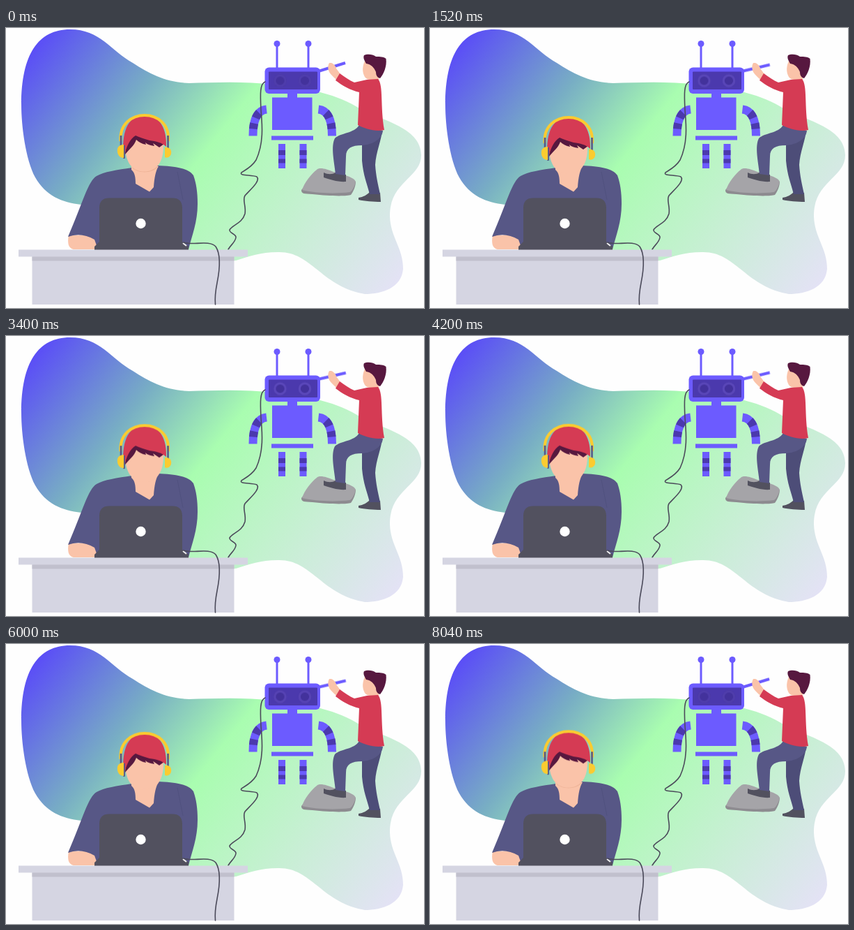
Animation, 600 px wide and 401 px high, one loop 8.08 s. Source, as an HTML page:

```html
<!DOCTYPE html>
<html lang="en">
<head>
<meta charset="utf-8">
<title>Building a robot</title>
<style>
  :root {
    --loop: 8080ms;
    --violet: #6c5bff; --deep: #4b39ad;
    --navy: #575786; --shade: #4d4d78; --dark: #52515f;
    --skin: #fac3a9; --red: #d53b54; --plum: #57183f; --yellow: #fbcb30;
  }
  html, body { margin: 0; width: 100%; height: 100%; overflow: hidden; background: #fefefe; }
  svg { display: block; width: 100%; height: 100%; }
  .violet { fill: var(--violet); }
  .deep { fill: var(--deep); }
  .navy { fill: var(--navy); }
  .shade { fill: var(--shade); }
  .dark { fill: var(--dark); }
  .skin { fill: var(--skin); }
  .red { fill: var(--red); }
  .plum { fill: var(--plum); }
  .yellow { fill: var(--yellow); }
  .line { fill: none; stroke: #4b4a5a; stroke-width: 1.6; stroke-linecap: round; }
  .arm { fill: none; stroke: var(--violet); stroke-width: 12; }
  .bands { stroke: var(--deep); stroke-dasharray: 0 12 9 8 8 40; }

  .head { animation: nod calc(var(--loop) / 18) ease-in-out infinite; }
  .tool { transform-origin: 450px 61.5px; animation: turn calc(var(--loop) / 18) ease-in-out infinite; }
  .glow { animation: glow calc(var(--loop) / 8) linear infinite; }
  @keyframes nod { 50% { transform: translateY(3.3px); } }
  @keyframes turn { 50% { transform: rotate(4.5deg); } }
  @keyframes glow {
    0%, 80%, 100% { opacity: 0; }
    8% { opacity: .85; }
    30% { opacity: 1; }
    51% { opacity: .75; }
  }
</style>
</head>
<body>
<svg viewBox="0 0 600 401" preserveAspectRatio="none">
  <defs>
    <linearGradient id="sky" gradientUnits="userSpaceOnUse" x1="25" y1="50" x2="517" y2="443">
      <stop offset="0" stop-color="#5b4ff6"/>
      <stop offset=".25" stop-color="#78aec4"/>
      <stop offset=".45" stop-color="#a9fdb0"/>
      <stop offset="1" stop-color="#e6e1f8"/>
    </linearGradient>
    <g id="eye">
      <circle r="9.5" fill="#43329c"/>
      <circle class="glow" r="7.8" fill="none" stroke="#5b48ba" stroke-width="3.4"/>
    </g>
    <g id="limb">
      <path class="arm" d="M374 116.500C361 118 354.500 130 354.500 154.500"/>
      <path class="arm bands" d="M374 116.500C361 118 354.500 130 354.500 154.500"/>
      <path class="violet" d="M391 166h10v35h-10z"/>
      <path class="deep" d="M391 175h10v7h-10zM391 187.500h10v6h-10z"/>
    </g>
  </defs>

  <path fill="url(#sky)" d="M22 110C22 38 46 2 92 2C135 2 150 32 182 50C207 66 230 78 263 79
    C300 78 340 76 385 81C430 84 480 97 507 115C530 130 596 140 596 182C596 215 550 220 551 270
    C552 300 570 315 570 345C568 372 540 381 515 381C452 370 438 319 390 321C365 321 350 327 330 333
    L200 340L140 265L108 253C80 250 57 240 42 214C28 188 22 140 22 110Z"/>

  <!-- robot -->
  <path d="M389 22V58M434 22V58" stroke="#6c5bff" stroke-width="3"/>
  <circle class="violet" cx="389" cy="22.500" r="4.500"/>
  <circle class="violet" cx="434" cy="22.500" r="4.500"/>
  <rect class="violet" x="371.500" y="56.500" width="79.500" height="37.500" rx="6"/>
  <rect class="deep" x="377" y="62.500" width="70" height="25.500" rx="1"/>
  <use href="#eye" x="393.500" y="75.500"/>
  <use href="#eye" x="429" y="75.500"/>
  <path class="violet" d="M404 93h14v6.500h21.500v46.500h-57.500v-46.500h22zM381 154.500h60v6h-60z"/>
  <use href="#limb"/>
  <use href="#limb" transform="matrix(-1 0 0 1 822.5 0)"/>

  <!-- engineer -->
  <path fill="#8d8b90" d="M424 232C424 238 428 237 440 238C465 241 490 241 495 239C499 234 502 226 502 220L440 212Z"/>
  <path fill="#a5a4a8" d="M446 203C450 199 460 202 470 206C485 210 500 214 502 220C500 227 498 232 494 235
    C470 238 440 236 425 232C428 222 438 209 446 203Z"/>
  <path class="dark" d="M456 207C462 210 468 210 473 207L488 210L488 220C478 221 464 217 456 214Z"/>
  <path class="dark" d="M506 243C513 242 518 239 522 235L537 236L538 249C528 249 514 248 506 246Z"/>
  <path class="shade" d="M511 160L540 147C539 160 531 178 530 196C531 212 534 224 537 238L522 238
    C518 222 513 212 511 190Z"/>
  <path class="navy" d="M507 139L541 147C540 158 528 167 511 168C496 168 488 172 488 184L487 211L473 209
    C471 190 466 170 472 158C480 150 500 151 507 139Z"/>
  <path class="skin" d="M515 47C512 54 511 61 514 68C516 73 520 74 524 74L520 79L535 79L535 55Z"/>
  <path class="plum" d="M514 39C518 37 526 37 531 41C537 41 542 41 545.500 44C547 55 542 66 537 72
    C533 71 531 68 531 63C528 56 524 52 517 51C515 47 512 43 514 39Z"/>
  <path class="tool" d="M450 61.500L487 50" stroke="#6c5bff" stroke-width="4"/>
  <path class="skin" d="M464 50C461 55 462 62 467 67L474 74L480 66L474 58C474 55 470 51 467 50Z"/>
  <path class="red" d="M518 74L534 73C542 82 537 112 543 146C530 149 515 144 505 139L507 92
    C494 89 482 82 473 75L479 65C486 70 493 75 500 78Z"/>

  <path class="line" d="M372 77C364 80 365 96 366 118C368 140 370 165 359 189C352 200 342 204 338 207
    C334 212 352 210 360 213C366 219 350 232 343 240C339 247 345 255 343 266C339 280 325 282 321 289
    C320 294 331 295 330 300C329 307 323 310 319 317"/>

  <!-- coder -->
  <path class="skin" d="M90 297C87 312 92 317 99 317L130 317L138 306L126 296Z"/>
  <path class="navy" d="M181 200C160 203 140 206 130 212C118 219 111 248 89 299Q108 292 127 303L132 317L262 317
    C267 297 275 278 275 252C275 235 273 222 269 211C262 201 245 198 217 197Z"/>
  <path d="M246 206L254 246" fill="none" stroke="#4f507d" stroke-width=".8"/>
  <path class="skin" d="M180 197L180 203C185 207 186 214 186 223L206 234.500L212 228C213 214 215 204 219 198Z"/>
  <path fill="#eeb397" d="M181 200C188 208 208 209 217 200L217 196L181 196Z"/>

  <g class="head">
    <path class="skin" d="M171 168C171 196 184 205.500 198 205.500C214 205.500 225 195 226 172L226 160L190 148Z"/>
    <path class="plum" d="M171 181C171 170 178 157 186 151L208 156L227 166L220 171L211 165L213 169
      C207 168 203 167 200 164L201 167C195 166 190 163 187 160C184 169 178 172 171 181Z"/>
    <path class="red" d="M168.500 181C166 145 177 125 199 125C222 125 231 146 230 170
      C224 164 215 162 206 161C198 159 191 156 186 154C178 159 174 168 170 181Z"/>
    <path d="M164.500 162C161 112.500 237 112.500 233 162" fill="none" stroke="#fbcb30" stroke-width="4"/>
    <path d="M165 154V172M232.500 154V174M169.500 168V187" stroke="#575786" stroke-width="2.600"/>
    <path class="yellow" d="M169 167C162 167 159 171 160 178C161 183 164 186 169 186Z"/>
    <path class="yellow" d="M228 171C234 170 238 174 237 180C236 184 232 187 228 185Z"/>
  </g>

  <path class="dark" d="M134 258C134 248 139 243.500 148 243.500H239C248 243.500 253 248 253 258V306L262 313V318H127V313L134 306Z"/>
  <circle cx="193.500" cy="280" r="7.200" fill="#fff"/>
  <path d="M254 308L259 312" stroke="#eee" stroke-width="2"/>

  <!-- desk -->
  <path fill="#d5d5e2" d="M18 317.500H347V327.500H327.500V396H37.500V327.500H18Z"/>
  <path fill="#c1c0cd" d="M37.500 327.500H327.500V333.500H37.500Z"/>
  <path class="line" d="M255 307C266 312 292 303 301 313C309 325 307 345 303 365C300 380 300 390 300.500 396"/>
</svg>
</body>
</html>
```
